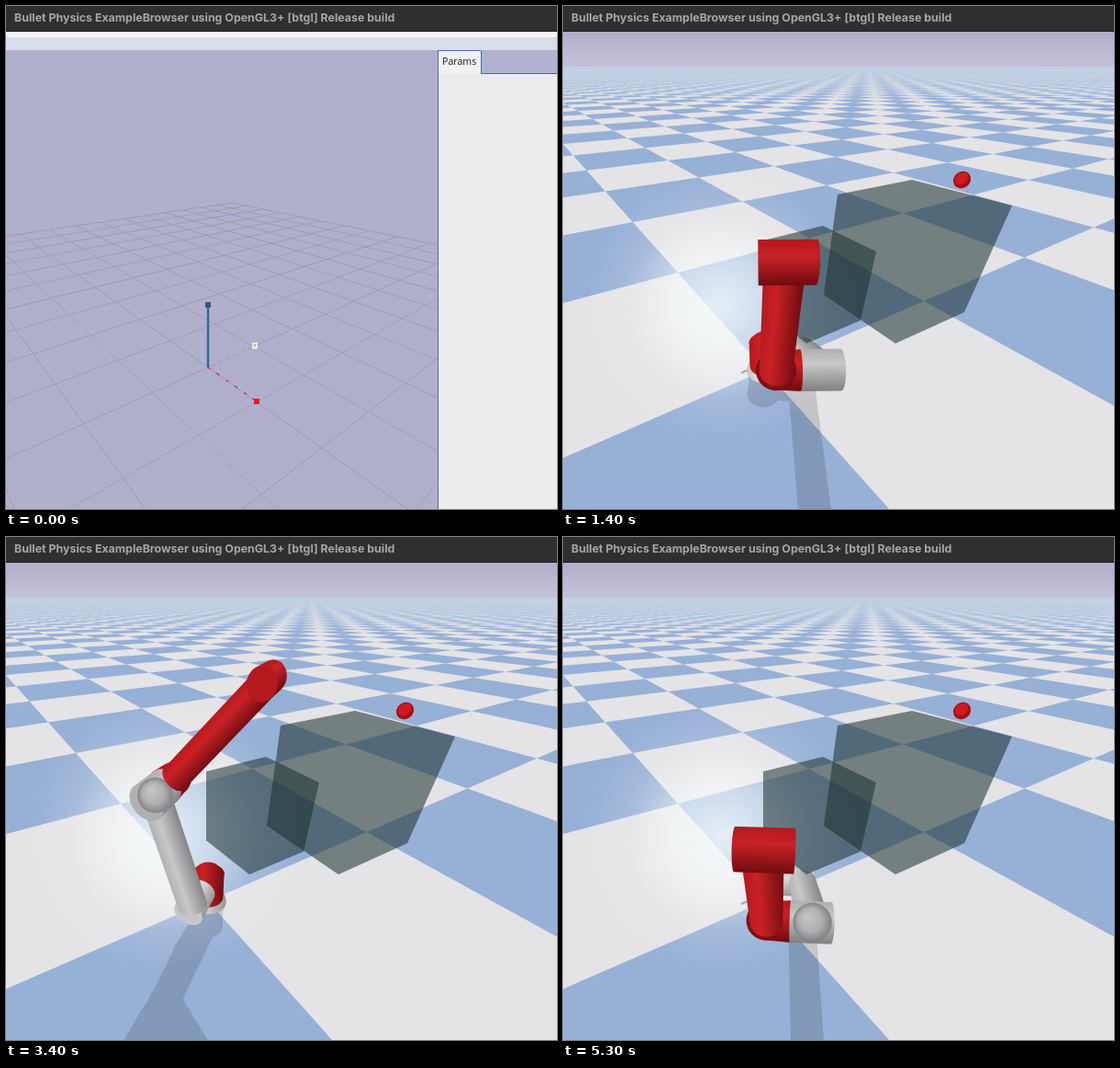
Recreate the animation shown at these times as an HTML page with a canvas. Size 600 by 547 pixels, loop 5400 ms.

```html
<!DOCTYPE html>
<html lang="en">
<head>
<meta charset="utf-8">
<title>Robot arm</title>
<style>
html, body { margin: 0; width: 100%; height: 100%; overflow: hidden; background: #b0b0cc; }
canvas { display: block; }
</style>
</head>
<body>
<canvas id="stage" width="600" height="547"></canvas>
<script>
const W = 600, H = 547, LOOP = 5400, STEP = 100;
const ctx = document.getElementById('stage').getContext('2d');
const layer = () => {
  const c = document.createElement('canvas');
  c.width = W; c.height = H;
  return c.getContext('2d');
};
const floor = layer(), shade = layer();

// Time, base turn, upper arm elevation, forearm elevation (degrees)
const KEYS = [
  [100, 30, 175, 168], [400, -31, 102, 53], [800, -150, 160, 165], [1100, 40, 150, 140],
  [1400, -31, 147, 110], [1600, -130, 150, 165], [1800, 30, 160, 150], [2000, -150, 160, 165],
  [2300, 10, 152, 103], [2600, 50, 165, 150], [2900, -140, 150, 150], [3100, -120, 70, 30],
  [3400, -144, 105, 47], [3700, -90, 150, 160], [4000, 46, 181, 160], [4300, 60, 150, 130],
  [4700, -100, 110, 100], [4900, -60, 140, 120], [5300, -35, 154, 117]
];
const RED = ['#b4191e', '#c92126', '#700c10'];
const GREY = ['#b0b0b2', '#c8c8ca', '#828284'];
const PALE = ['#c6c6c8', '#dcdcde', '#949496'];

const add = (a, b, k = 1) => a.map((v, i) => v + b[i] * k);
const mix = (a, b, k) => a.map((v, i) => v + (b[i] - v) * k);
const cross = (a, b) => [a[1] * b[2] - a[2] * b[1], a[2] * b[0] - a[0] * b[2], a[0] * b[1] - a[1] * b[0]];
const unit = a => { const n = Math.hypot(...a) || 1; return a.map(v => v / n); };
const rawDepth = ([x, y, z]) => 1 + .2896 * x + .465 * y - .4555 * z;
const depth = p => Math.max(.12, rawDepth(p));

function project(p) {
  const [x, y, z] = p, d = depth(p);
  return [(220 + 286.7 * x - 36.7 * y - 99.3 * z) / d, (396 + 18 * x + 28.8 * y - 373.5 * z) / d];
}
const drop = ([x, y, z]) => [x - .52 * z, y - .76 * z, 0];
const onGround = p => project(drop(p));

function hull(points) {
  const pts = points.slice().sort((a, b) => a[0] - b[0] || a[1] - b[1]);
  const half = list => {
    const out = [];
    for (const p of list) {
      while (out.length > 1) {
        const a = out[out.length - 2], b = out[out.length - 1];
        if ((b[0] - a[0]) * (p[1] - a[1]) - (b[1] - a[1]) * (p[0] - a[0]) > 0) break;
        out.pop();
      }
      out.push(p);
    }
    return out.slice(0, -1);
  };
  return half(pts).concat(half(pts.reverse()));
}

function fill(g, pts, style) {
  g.beginPath();
  pts.forEach(p => g.lineTo(p[0], p[1]));
  g.closePath();
  g.fillStyle = style;
  g.fill();
}

function ring(c, axis, r) {
  const u = unit(cross(axis, Math.abs(axis[2]) > .9 ? [1, 0, 0] : [0, 0, 1])), v = cross(axis, u);
  return Array.from({ length: 24 }, (_, i) => {
    const t = i * Math.PI / 12;
    return add(add(c, u, r * Math.cos(t)), v, r * Math.sin(t));
  });
}

function tube(a, b, ra, rb, tone) {
  const axis = unit(add(b, a, -1));
  const ends = [ring(a, axis, ra), ring(b, axis, rb)];
  return {
    depth: (depth(a) + depth(b)) / 2,
    shadow: () => fill(shade, hull(ends.flat().map(onGround)), '#000'),
    draw() {
      const p = project(a), q = project(b), m = mix(p, q, .5);
      let n = unit([q[1] - p[1], p[0] - q[0]]);
      if (n[0] + n[1] * .5 > 0) n = n.map(v => -v);
      const w = 261 * Math.max(ra, rb) / this.depth;
      const from = add(m, n, w), to = add(m, n, -w);
      const g = ctx.createLinearGradient(from[0], from[1], to[0], to[1]);
      tone.forEach((c, i) => g.addColorStop([0, .35, 1][i], c));
      fill(ctx, hull(ends.flat().map(project)), g);
      const near = depth(a) < depth(b) ? 0 : 1;
      if (Math.abs(depth(a) - depth(b)) > .02) fill(ctx, ends[near].map(project), tone[0]);
    }
  };
}

function ball(c, r, tone) {
  return {
    depth: depth(c),
    shadow() {
      const p = onGround(c);
      shade.beginPath();
      shade.arc(p[0], p[1], 261 * r / depth(drop(c)), 0, 7);
      shade.fill();
    },
    draw() {
      const [x, y] = project(c), s = 261 * r / this.depth;
      const g = ctx.createRadialGradient(x - s * .3, y - s * .3, 0, x, y, s);
      g.addColorStop(0, tone[1]); g.addColorStop(.6, tone[0]); g.addColorStop(1, tone[2]);
      ctx.beginPath(); ctx.arc(x, y, s, 0, 7); ctx.fillStyle = g; ctx.fill();
    }
  };
}

const glass = (depth, pts) => ({ depth, draw: () => fill(ctx, pts, 'rgba(26,48,46,.55)') });
const BOXES = [
  glass(.6, [[218, 255], [283, 239], [341, 267], [324, 342], [265, 367], [218, 330]]),
  glass(.45, [[299, 205], [380, 189], [489, 217], [437, 333], [362, 367], [284, 314]])
];

function armParts(turn, upper, fore) {
  const rad = Math.PI / 180, t = turn * rad;
  const e = [Math.cos(t), Math.sin(t), 0], r = [-e[1], e[0], 0];
  const dir = a => add(r.map(v => v * Math.cos(a * rad)), [0, 0, Math.sin(a * rad)]);
  const base = [0, 0, .105];
  const shoulder = add(base, e, .148);
  const elbow = add(shoulder, dir(upper), .425);
  const inner = add(elbow, e, -.125);
  const wrist = add(inner, dir(fore), .4);
  return [
    tube([0, 0, 0], [0, 0, .025], .075, .07, PALE),
    tube([0, 0, .025], [0, 0, .145], .062, .062, RED),
    { ...tube([0, 0, .144], [0, 0, .166], .062, .045, RED), depth: .93 },
    tube(add(base, e, .06), add(shoulder, e, .04), .052, .055, PALE),
    tube(shoulder, elbow, .053, .046, GREY),
    ball(elbow, .053, GREY),
    tube(add(elbow, e, .05), add(elbow, e, -.06), .056, .056, GREY),
    tube(add(elbow, e, -.06), inner, .056, .052, RED),
    ball(inner, .055, RED),
    tube(inner, wrist, .045, .036, RED),
    tube(add(wrist, e, -.045), add(wrist, e, .053), .037, .037, RED)
  ];
}

function paintFloor(g) {
  const sky = g.createLinearGradient(0, 28, 0, 67);
  sky.addColorStop(0, '#b2adc8'); sky.addColorStop(1, '#c5c3d9');
  g.fillStyle = sky; g.fillRect(0, 0, W, 67);
  g.fillStyle = '#e4e3e6'; g.fillRect(0, 66, W, H);
  for (let i = -60; i < 70; i++) for (let j = -30; j < 70; j++) {
    if ((i + j) & 1) continue;
    const corners = [[i, j, 0], [i + 1, j, 0], [i + 1, j + 1, 0], [i, j + 1, 0]];
    if (corners.every(c => rawDepth(c) > .13)) fill(g, corners.map(project), '#97b0d6');
  }
  const haze = g.createLinearGradient(0, 66, 0, 105);
  haze.addColorStop(0, 'rgba(191,207,228,1)');
  haze.addColorStop(.35, 'rgba(191,207,228,.65)');
  haze.addColorStop(1, 'rgba(191,207,228,0)');
  g.fillStyle = haze; g.fillRect(0, 66, W, 39);
  const glow = g.createRadialGradient(172, 325, 0, 172, 325, 145);
  glow.addColorStop(0, 'rgba(250,255,255,.8)');
  glow.addColorStop(.4, 'rgba(250,255,255,.5)');
  glow.addColorStop(.7, 'rgba(250,255,255,.15)');
  glow.addColorStop(1, 'rgba(250,255,255,0)');
  g.fillStyle = glow; g.fillRect(0, 170, 340, 330);
}

function titleBar() {
  ctx.fillStyle = '#302e30'; ctx.fillRect(0, 0, W, 27);
  ctx.fillStyle = '#1f1e20'; ctx.fillRect(0, 27, W, 1);
  ctx.fillStyle = '#a8a6a8';
  ctx.font = '700 12.4px Inter, "Liberation Sans", sans-serif';
  ctx.fillText('Bullet Physics ExampleBrowser using OpenGL3+ [btgl] Release build', 9, 17);
}

function line(x0, y0, x1, y1, color, width, dash = []) {
  ctx.beginPath(); ctx.moveTo(x0, y0); ctx.lineTo(x1, y1);
  ctx.strokeStyle = color; ctx.lineWidth = width; ctx.setLineDash(dash); ctx.stroke();
  ctx.setLineDash([]);
}

function box(x, y, w, h, color) { ctx.fillStyle = color; ctx.fillRect(x, y, w, h); }

function startScreen() {
  box(0, 0, W, H, '#b0b0cc');
  const a = .0954, b = .126;
  const at = (i, j) => {
    const d = 1 + a * i + b * j;
    return [(220 + 794 * a * i - 147 * b * j) / d, (393 + 133 * (a * i + b * j)) / d];
  };
  for (let k = -10; k <= 10; k++) {
    const color = k & 1 ? '#a39fab' : '#999eb3';
    line(...at(k, Math.max(-10, (-.9 - a * k) / b)), ...at(k, 10), color, 1);
    line(...at(Math.max(-10, (-.9 - b * k) / a), k), ...at(10, k), color, 1);
  }
  line(220, 393, 273, 430, '#c42a38', 1.3, [3, 8, 4, 9]);
  line(220, 393, 270, 370, '#c4c3c4', 1, [2, 7]);
  line(220, 393, 220, 325, '#2d679f', 2.4);
  box(217, 322, 6, 6, '#3b566f');
  box(270, 427, 6, 6, '#f01724');
  box(268, 366, 6, 7, '#e9e9dc'); box(270, 368, 2, 2, '#a5a5a0');
  box(0, 28, W, 7, '#f3f4f6'); box(0, 34, W, 14, '#d7deeb');
  box(470, 48, 130, 25, '#b0b2cf');
  box(470, 73, 130, H, '#ebecee'); box(470, 49, 47, 25, '#f0f1f3');
  line(470.5, H, 470.5, 49, '#4d6ba5', 1); line(470, 48.5, 517, 48.5, '#4d6ba5', 1);
  line(517.5, 49, 517.5, 73, '#4d6ba5', 1); line(517, 73.5, W, 73.5, '#4d6ba5', 1);
  ctx.fillStyle = '#1b1b1b';
  ctx.font = '10.6px "Open Sans", "Noto Sans", sans-serif';
  ctx.fillText('Params', 475, 64);
}

function poseAt(t) {
  const n = KEYS.findIndex(k => k[0] >= t);
  if (n < 1) return KEYS[n < 0 ? KEYS.length - 1 : 0].slice(1);
  const p = KEYS[n - 1], q = KEYS[n];
  return mix(p, q, (t - p[0]) / (q[0] - p[0])).slice(1);
}

function robotScene(t) {
  ctx.drawImage(floor.canvas, 0, 0);
  const parts = armParts(...poseAt(t));
  shade.clearRect(0, 0, W, H);
  shade.fillStyle = '#000';
  parts.forEach(p => p.shadow());
  ctx.globalAlpha = .13;
  ctx.drawImage(shade.canvas, 0, 0);
  ctx.globalAlpha = 1;
  line(194, 399, 208, 393, '#a5a5a5', 2);
  ctx.beginPath(); ctx.ellipse(434.5, 189, 10, 8.8, -.6, 0, 7);
  ctx.fillStyle = '#a60d12'; ctx.fill();
  ctx.beginPath(); ctx.ellipse(434, 187.5, 8, 6, -.6, 0, 7);
  ctx.fillStyle = '#cc1a20'; ctx.fill();
  parts.concat(BOXES).sort((p, q) => q.depth - p.depth).forEach(p => p.draw());
}

function render(now) {
  const t = Math.floor(now % LOOP / STEP) * STEP;
  if (t < 100) startScreen(); else robotScene(t);
  titleBar();
}

paintFloor(floor);
const begin = performance.now();
(function tick() {
  render(performance.now() - begin);
  requestAnimationFrame(tick);
})();
</script>
</body>
</html>
```
